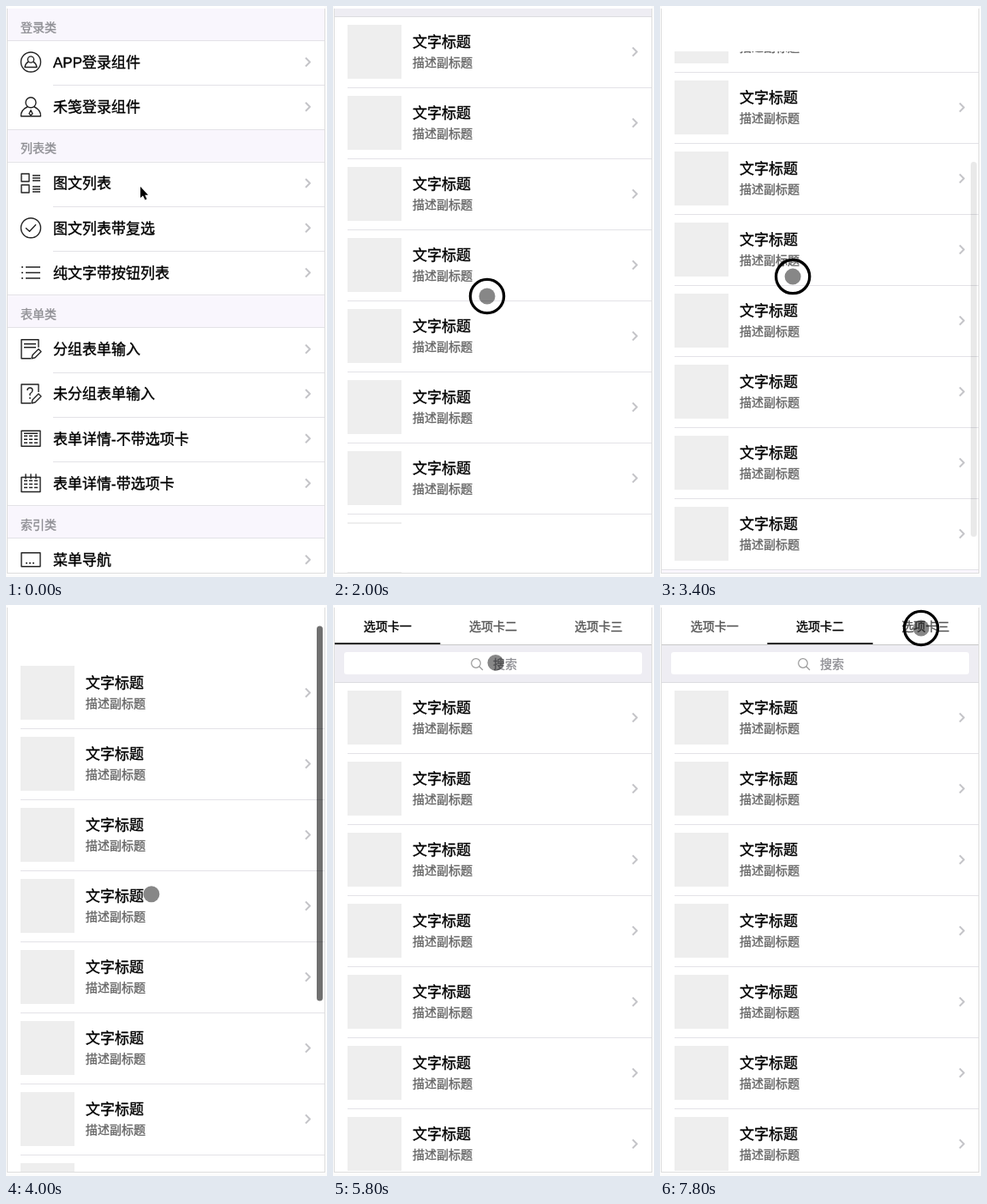
An HTML page with a canvas that plays this animation: 375 by 667 pixels, repeating every 8000 ms.

```html
<!DOCTYPE html>
<html lang="zh-CN">
<head>
<meta charset="utf-8">
<style>
  html, body { margin: 0; width: 100%; height: 100%; overflow: hidden; background: #fff; }
  canvas { display: block; width: 375px; height: 667px; }
</style>
</head>
<body>
<canvas id="stage"></canvas>
<script>
const LOOP = 8000, STEP = 200;
const LEFT = 2, TOP = 3, WIDTH = 370, BOTTOM = 662;
const MAX_SCROLL = 324;
const FONT = '"Liberation Sans", "Noto Sans CJK SC", "Noto Sans CJK", sans-serif';
const LINE = '#e3e2e7', LAVENDER = '#f9f6fd';

const canvas = document.getElementById('stage');
const ctx = canvas.getContext('2d');
const ratio = window.devicePixelRatio || 1;
canvas.width = 375 * ratio;
canvas.height = 667 * ratio;

// Where the pointer rests or turns; a drag runs from its stop to the next one.
const stops = [
  { at: 0, x: 157, y: 212 },
  { at: 800, x: 157, y: 212 },
  { at: 1600, x: 182, y: 418, drag: true },
  { at: 2400, x: 178, y: 260 },
  { at: 3100, x: 152, y: 250, drag: true },
  { at: 3800, x: 160, y: 418 },
  { at: 4300, x: 188, y: 190, drag: true },
  { at: 4800, x: 190, y: 255 },
  { at: 6200, x: 190, y: 21 },
  { at: 7000, x: 190, y: 21 },
  { at: 7600, x: 305, y: 27 }
];
const taps = [200, 6600, 7800];

const clamp = p => Math.min(1, Math.max(0, p));

function smooth(p) {
  p = clamp(p);
  return p * p * (3 - 2 * p);
}

// cubic-bezier(.35, 0, .25, 1), solved by bisection
function ease(p) {
  let low = 0, high = 1;
  for (let i = 0; i < 20; i++) {
    const u = (low + high) / 2, v = 1 - u;
    if (1.05 * u * v * v + .75 * u * u * v + u ** 3 < clamp(p)) low = u; else high = u;
  }
  return smooth(low);
}

const scrollAt = time =>
  Math.round(MAX_SCROLL * (smooth((time - 1600) / 1250) - smooth((time - 3086) / 1120)));

function barAlpha(time) {
  const shown = (from, to) => smooth((time - from) / 400) - smooth((time - to) / 400);
  return .56 * (shown(2000, 2800) + shown(3300, 5000));
}

function pointerAt(time) {
  const index = stops.findIndex(stop => stop.at >= time);
  const to = stops.at(index), from = stops[Math.max(0, stops.indexOf(to) - 1)];
  const p = smooth((time - from.at) / (to.at - from.at || 1));
  return {
    x: from.x + (to.x - from.x) * p,
    y: from.y + (to.y - from.y) * p,
    pressed: taps.includes(time) || index > 0 && from.drag
  };
}

function rect(x, y, w, h, color) {
  ctx.fillStyle = color;
  ctx.fillRect(x, y, w, h);
}

function roundRect(x, y, w, h, r, color) {
  ctx.beginPath();
  ctx.roundRect(x, y, w, h, r);
  ctx.fillStyle = color;
  ctx.fill();
}

// A hairline outline gives the type its slightly heavier weight.
function text(label, x, middle, size, color, align = 'left') {
  const baseline = Math.round(middle + size * .34);
  ctx.font = `${size}px ${FONT}`;
  ctx.textAlign = align;
  ctx.fillStyle = ctx.strokeStyle = color;
  ctx.lineWidth = .35;
  ctx.fillText(label, x, baseline);
  ctx.strokeText(label, x, baseline);
}

function strokePath(d, x, y, color, width) {
  ctx.save();
  ctx.translate(x, y);
  ctx.strokeStyle = color;
  ctx.lineWidth = width;
  ctx.lineJoin = 'round';
  ctx.stroke(new Path2D(d));
  ctx.restore();
}

const chevron = y => strokePath('M-3-5l5 5-5 5', 353, y, '#c4c4c8', 2);

const circle = (x, y, r) => `M${x - r} ${y}a${r} ${r} 0 1 0 ${2 * r} 0a${r} ${r} 0 1 0 ${-2 * r} 0`;
const box = (x, y, w, h) => `M${x} ${y}h${w}v${h}h${-w}z`;
const rows = (x, width, ...ys) => ys.map(y => `M${x} ${y}h${width}`).join('');
const cells = [-8, -2, 4].map(x => rows(x, 4, -3, 1, 5)).join('');
const sheet = 'M0 11h-11v-22h20v9M1 11l1-4 7-7 3 3-7 7z';

const groups = {
  '登录类': {
    'APP登录组件': circle(0, 0, 11.5) + circle(0, -3, 3.6) + 'M-3 0q-3 1-4 6h14q-1-5-4-6',
    '禾笺登录组件': circle(0, -5, 6) + 'M-4 0q-8 4-7.5 11h23q.5-7-7.5-11M0 4l2 4-2 2-2-2z'
  },
  '列表类': {
    '图文列表': box(-11, -11, 9, 9) + box(-11, 2, 9, 9) + rows(2, 9, -9, -6, -3, 4, 7, 10),
    '图文列表带复选': circle(0, 0, 11.5) + 'M-6 0l4.5 4L6-4',
    '纯文字带按钮列表': rows(-11, 2, -6.5, 0, 6.5) + rows(-6, 17, -6.5, 0, 6.5)
  },
  '表单类': {
    '分组表单输入': sheet + rows(-8, 14, -6, -2),
    '未分组表单输入': sheet + 'M-4-4q0-3 3-3t3 3q0 2-3 4v2m0 2v2',
    '表单详情-不带选项卡': box(-11, -9, 22, 18) + cells + rows(-8, 16, -6),
    '表单详情-带选项卡': box(-11, -7, 22, 17) + cells + 'M-6-11v6m6-6v6m6-6v6'
  },
  '索引类': {
    '菜单导航': box(-11, -8, 22, 16) + 'M-6 4h2m2 0h2m2 0h2'
  }
};

function drawMenu() {
  const header = 37, rowHeight = 52.25;
  let y = TOP;
  for (const [name, items] of Object.entries(groups)) {
    rect(LEFT, y, WIDTH, header, LAVENDER);
    for (const edge of [y - 1, y + header]) rect(LEFT, Math.round(edge), WIDTH, 1, LINE);
    text(name, 17, y + 22, 14, '#8e8e93');
    y += header;
    Object.entries(items).forEach(([label, icon], i) => {
      const middle = y + 26;
      if (i) rect(55, Math.round(y), 317, 1, LINE);
      strokePath(icon, 29, middle - .5, '#222', 1.4);
      text(label, 55, middle, 17, '#000');
      chevron(middle - .5);
      y += rowHeight;
    });
  }
}

function drawTabs(time) {
  const tabWidth = WIDTH / 3, active = time >= 6800 ? 1 : 0;
  // The right end of the marker leads, the left end follows 90 ms later.
  const right = LEFT + tabWidth * (1 + ease((time - 6750) / 300));
  const left = LEFT + tabWidth * ease((time - 6840) / 300);
  rect(LEFT, 46, WIDTH, 1, '#c8c8c8');
  rect(left, 44, right - left, 2, '#2a2a2a');
  ['选项卡一', '选项卡二', '选项卡三'].forEach((label, i) =>
    text(label, LEFT + tabWidth * (i + .5), 25, 14, i === active ? '#000' : '#555', 'center'));
}

function drawSearch() {
  rect(LEFT, 47, WIDTH, 43, '#eeedf3');
  roundRect(13, 55, 348, 26, 3, '#fff');
  strokePath(circle(-1, -1, 5.3) + 'M3 3l4 4', 168, 69, '#999', 1.2);
  text('搜索', 187, 69, 14, '#8e8e93');
  rect(LEFT, 90, WIDTH, 1, '#dcdce0');
}

function drawRows() {
  const first = 90, rowHeight = 83, count = 10, end = first + rowHeight * count;
  for (let y = first; y < end; y += rowHeight) {
    rect(17, y + 10, 63, 63, '#eee');
    text('文字标题', 93, y + 30, 17, '#000');
    text('描述副标题', 93, y + 54, 14, '#666');
    chevron(y + 41.5);
    rect(17, y + rowHeight, 355, 1, LINE);
  }
  rect(LEFT, end, WIDTH, 1, LINE);
  rect(LEFT, end + 1, WIDTH, 70, LAVENDER);
}

function drawList(time) {
  const scroll = scrollAt(time);
  ctx.save();
  ctx.translate(0, -scroll);
  drawTabs(time);
  drawSearch();
  drawRows();
  ctx.restore();

  // Newly exposed content stays blank for one step.
  const exposed = scrollAt(time - STEP) - scroll;
  rect(LEFT, exposed > 0 ? 0 : 661 + exposed, WIDTH, Math.abs(exposed), '#fff');

  const barTop = 5 + scroll / MAX_SCROLL * 219;
  roundRect(363, barTop, 7, 438, 3.5, `rgba(0,0,0,${barAlpha(time)})`);
}

function drawArrow(x, y) {
  ctx.save();
  ctx.translate(x, y);
  const arrow = new Path2D('M0-1v13l3-2.5 2.5 5 2-1-2.2-4.7H9z');
  ctx.strokeStyle = '#fff';
  ctx.lineWidth = 2;
  ctx.stroke(arrow);
  ctx.fillStyle = '#000';
  ctx.fill(arrow);
  ctx.restore();
}

function drawPointer(time) {
  const { x, y, pressed } = pointerAt(time);
  if (time < STEP) return drawArrow(x, y);
  ctx.fillStyle = 'rgba(0,0,0,.47)';
  ctx.fill(new Path2D(circle(x, y, 9.5)));
  if (pressed) strokePath(circle(0, 0, 19.6), x, y, '#000', 3.3);
}

function draw(now) {
  const time = Math.floor(now % LOOP / STEP) * STEP;
  ctx.setTransform(ratio, 0, 0, ratio, 0, 0);
  rect(0, 0, 375, 667, '#fcfcfc');
  rect(LEFT - 1, TOP, WIDTH + 2, BOTTOM - TOP + 1, '#dedede');
  rect(LEFT, 0, WIDTH, BOTTOM, '#fff');
  ctx.save();
  ctx.beginPath();
  ctx.rect(LEFT, TOP, WIDTH, BOTTOM - TOP);
  ctx.clip();
  if (time < 400) drawMenu(); else drawList(time);
  drawPointer(time);
  ctx.restore();
}

const startTime = performance.now();
function tick() {
  draw(performance.now() - startTime);
  requestAnimationFrame(tick);
}
tick();
</script>
</body>
</html>
```
